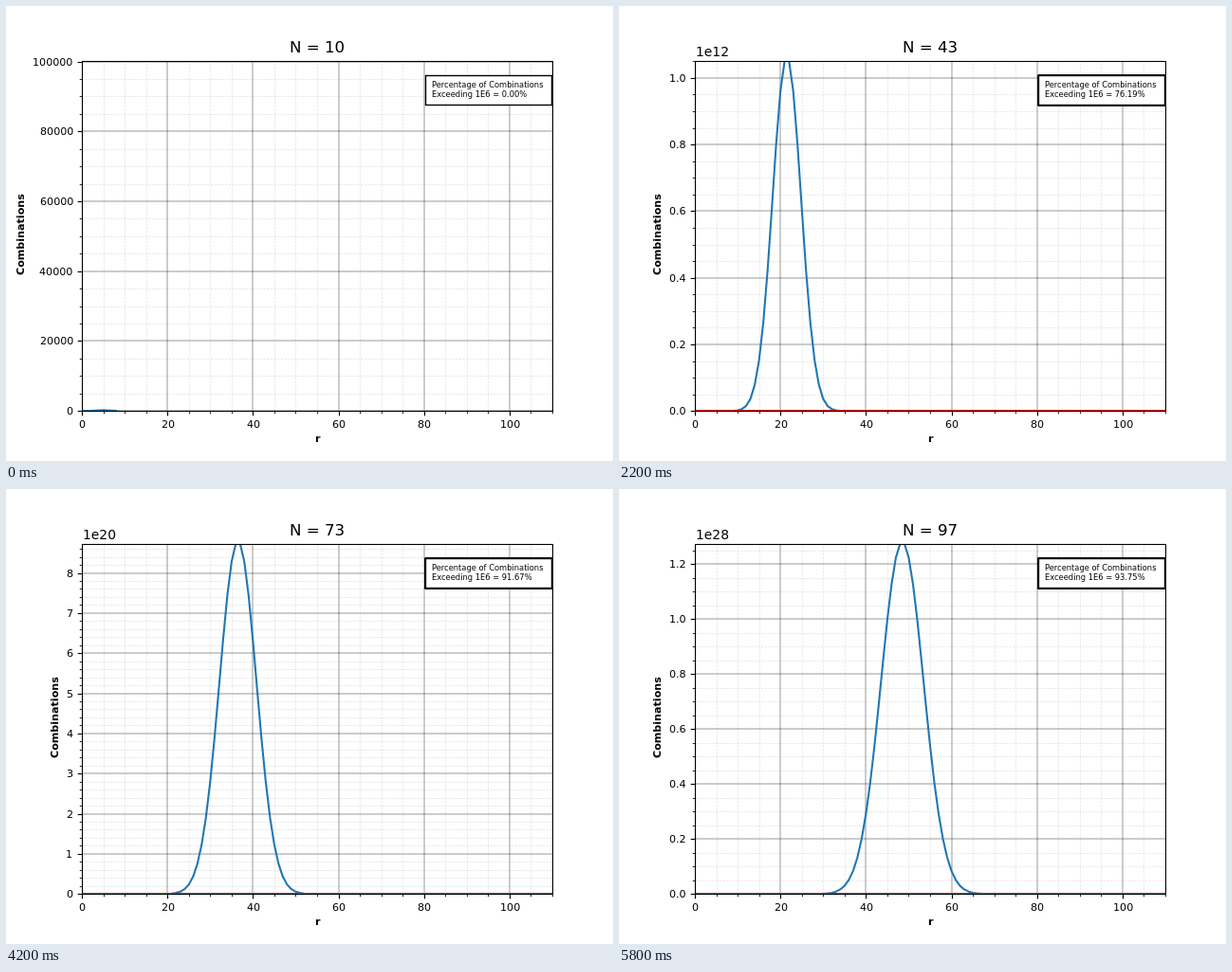
Recreate the animation shown at these times as an HTML page with a canvas. Size 640 by 480 pixels, loop 6000 ms.

```html
<!DOCTYPE html>
<html>
<head>
<meta charset="utf-8">
<title>Combinations</title>
<style>
  html, body { margin: 0; width: 100%; height: 100%; overflow: hidden; background: #fff; }
  canvas { display: block; }
</style>
</head>
<body>
<canvas id="stage" width="640" height="480"></canvas>
<script>
const ctx = document.getElementById('stage').getContext('2d');
const LEFT = 80, RIGHT = 576, TOP = 57.6, BOTTOM = 427.2, X_MAX = 110;
const STEP_MS = 200, STEPS = 30, LIMIT = 1e6;

const snap = v => Math.floor(v + 0.5) + 0.5;
const toX = r => LEFT + r / X_MAX * (RIGHT - LEFT);

function line(x1, y1, x2, y2, color, width, dash = []) {
  ctx.strokeStyle = color;
  ctx.lineWidth = width;
  ctx.setLineDash(dash);
  ctx.beginPath();
  ctx.moveTo(x1, y1);
  ctx.lineTo(x2, y2);
  ctx.stroke();
  ctx.setLineDash([]);
}

// Anchor: 0 left, 0.5 centre, 1 right. Snaps the ink's left edge to whole pixels.
function text(str, x, y, size, anchor = 0, weight = 'normal') {
  const setFont = px => ctx.font = `${weight} ${px}px "DejaVu Sans", sans-serif`;
  setFont(size * 100); // measured large for unrounded metrics
  const m = ctx.measureText(str);
  const width = m.width / 100, bearing = -m.actualBoundingBoxLeft / 100;
  setFont(size);
  ctx.fillStyle = '#000';
  ctx.fillText(str, Math.round(x - anchor * width + bearing) - Math.floor(bearing), y);
  return width;
}

// C(n, r) for r = 0 .. n - 2
function combinations(n) {
  const row = [1];
  for (let r = 1; r < n - 1; r++) row.push(row[r - 1] * (n - r + 1) / r);
  return row;
}

// Round step giving at most nine intervals
function niceStep(range) {
  const raw = range / 9, unit = 10 ** Math.floor(Math.log10(raw));
  const factor = [1, 2, 2.5, 5, 10].find(f => f * unit >= raw);
  return { step: factor * unit, parts: factor === 2 ? 4 : 5 };
}

function ticks(max, step, parts) {
  const list = [];
  for (let i = 0; i * step / parts <= max; i++)
    list.push({ value: i * step / parts, major: i % parts === 0 });
  return list;
}

function draw(index) {
  const n = 10 + 3 * index;
  const row = combinations(n);
  const yMax = Math.max(...row) + 1e5;
  const toY = v => BOTTOM - v / yMax * (BOTTOM - TOP);
  const { step, parts } = niceStep(yMax);
  const xTicks = ticks(X_MAX, 20, 4), yTicks = ticks(yMax, step, parts);

  ctx.fillStyle = '#fff';
  ctx.fillRect(0, 0, 640, 480);

  ctx.save();
  ctx.beginPath();
  ctx.rect(80, 58, 496, 370);
  ctx.clip();
  const gridPos = (t, v) => t.major ? Math.round(v) : snap(v);
  const grid = (t, ...ends) => t.major
    ? line(...ends, 'rgba(0,0,0,0.2)', 2)
    : line(...ends, 'rgba(0,0,0,0.12)', 0.7, [2.57, 1.11]);
  for (const t of xTicks) {
    const x = gridPos(t, toX(t.value));
    grid(t, x, BOTTOM, x, TOP);
  }
  for (const t of yTicks) {
    const y = gridPos(t, toY(t.value));
    grid(t, LEFT, y, RIGHT, y);
  }

  ctx.strokeStyle = '#1f77b4';
  ctx.lineWidth = 2.08;
  ctx.lineJoin = 'round';
  ctx.lineCap = 'square';
  ctx.beginPath();
  row.forEach((v, r) => ctx.lineTo(toX(r), toY(v)));
  ctx.stroke();
  ctx.lineCap = 'butt';

  const limitY = Math.round(toY(LIMIT));
  line(LEFT, limitY, RIGHT, limitY, '#f00', 2.08);
  ctx.restore();

  // Axis ticks and labels
  const order = Math.floor(Math.log10(Math.floor(yMax / step) * step) + 1e-9);
  const power = order >= 6 ? order : 0;
  const scale = 10 ** power;
  let digits = 0;
  while (Math.abs(step / scale * 10 ** digits % 1) > 1e-6) digits++;

  for (const t of xTicks) {
    const x = snap(toX(t.value));
    line(x, 427.5, x, 427.5 + (t.major ? 4.86 : 2.78), '#000', t.major ? 1.11 : 0.83);
    if (t.major) text(t.value, toX(t.value), 445, 11.11, 0.5);
  }
  let labelWidth = 0;
  for (const t of yTicks) {
    const y = snap(toY(t.value));
    line(80.5, y, 80.5 - (t.major ? 4.86 : 2.78), y, '#000', t.major ? 1.11 : 0.83);
    if (!t.major) continue;
    const label = (t.value / scale).toFixed(digits);
    const width = text(label, 70.2, Math.round(toY(t.value) + 4), 11.11, 1);
    labelWidth = Math.max(labelWidth, width);
  }

  ctx.strokeStyle = '#000';
  ctx.lineWidth = 1.11;
  ctx.strokeRect(80.5, 58.5, 496, 369);

  text(`N = ${n}`, 328, 49, 16.67, 0.5);
  text('r', 328, 460, 11.11, 0.5, 'bold');
  if (power) text(`1e${power}`, 80, 53, 13.89);

  ctx.save();
  ctx.translate(Math.round(61.85 - labelWidth), 242);
  ctx.rotate(-Math.PI / 2);
  text('Combinations', 0, 0, 11.11, 0.5, 'bold');
  ctx.restore();

  // The note is stacked once per step, so its outline grows heavier
  ctx.lineJoin = 'miter';
  ctx.lineWidth = 1.39;
  for (let i = 0; i <= index; i++) {
    ctx.fillStyle = '#fff';
    ctx.fillRect(442.5, 73.5, 133, 31);
    ctx.strokeRect(442.5, 73.5, 133, 31);
  }
  const share = row.filter(v => v > LIMIT).length / row.length * 100;
  text('Percentage of Combinations', 448, 86, 8.333);
  text(`Exceeding 1E6 = ${share.toFixed(2)}%`, 448, 96, 8.333);
}

function tick() {
  draw(Math.floor(performance.now() / STEP_MS) % STEPS);
  requestAnimationFrame(tick);
}
tick();
</script>
</body>
</html>
```
